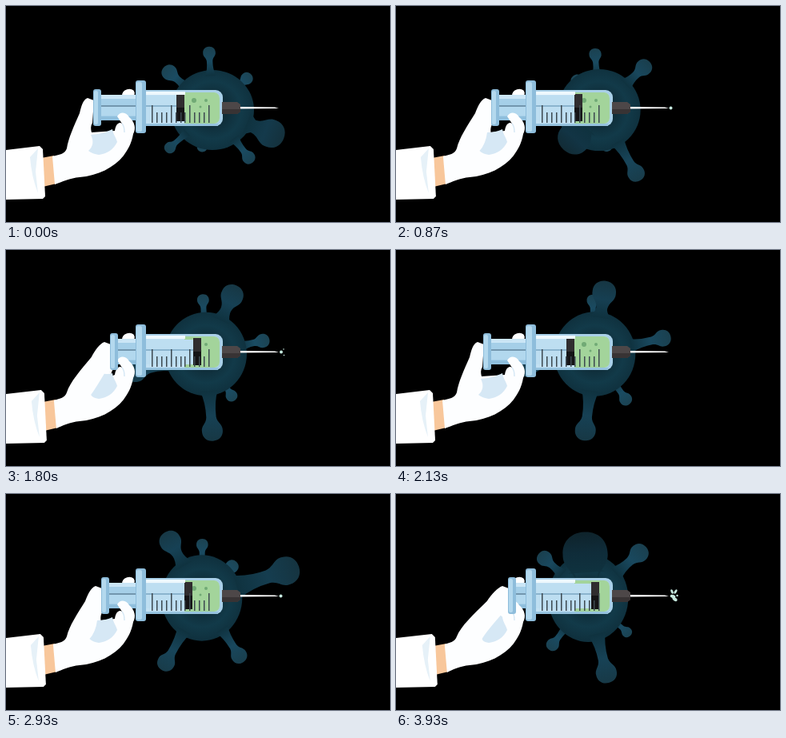
Animation of 480 by 270 pixels, one loop 3.99 s. Source, as an HTML page with a canvas:

```html
<!DOCTYPE html>
<html lang="en">
<head>
<meta charset="utf-8">
<title>Syringe and virus</title>
<style>
html, body { margin: 0; width: 100%; height: 100%; overflow: hidden; background: #000; }
canvas { display: block; width: 480px; height: 270px; }
</style>
</head>
<body>
<canvas id="stage" width="480" height="270"></canvas>
<script>
const c = document.getElementById('stage').getContext('2d');
const LOOP = 3990, STEP = 1000 / 15, PUSH = 170;
const SPIN = 46.5, CAMERA = 118;

// Start angle in degrees, distance from the axis, height, head size.
const spikes = [
  { angle: 0, reach: 45, height: 59, size: 8.5 },
  { angle: -17, reach: 50, height: -44, size: 9 },
  { angle: 140, reach: 5, height: -69, size: 8 },
  { angle: -92, reach: 78, height: -18, size: 10 },
  { angle: -113, reach: 43, height: 61, size: 9 },
  { angle: 172, reach: 50, height: 44, size: 7 },
  { angle: 189, reach: 58, height: -50, size: 11 },
  { angle: 60, reach: 70, height: 14, size: 9 }
];

function fill(color, path) {
  c.fillStyle = color;
  c.fill(new Path2D(path));
}
function box(color, x, y, w, h, r = 0) {
  c.fillStyle = color;
  c.beginPath();
  c.roundRect(x, y, w, h, r);
  c.fill();
}
function dot(color, x, y, rx, ry = rx, turn = 0) {
  c.fillStyle = color;
  c.beginPath();
  c.ellipse(x, y, rx, ry, turn, 0, 7);
  c.fill();
}
function blend(gradient, ...colors) {
  colors.forEach((color, i) => gradient.addColorStop(i / (colors.length - 1), color));
  return gradient;
}

// Turns a spike about the vertical axis and puts it in perspective.
function project(spike, t) {
  const a = (spike.angle + SPIN * t / 1000) * Math.PI / 180;
  const z = spike.reach * Math.sin(a), scale = 1 / (1 - z / CAMERA);
  return { z, scale, x: spike.reach * Math.cos(a) * scale, y: spike.height * scale, r: spike.size * scale };
}

function drawSpike({ x, y, r, scale }) {
  const dist = Math.hypot(x, y), base = Math.min(46, dist * .6) - dist;
  const light = Math.max(14, 29 - 5 * scale);
  const tone = blend(c.createLinearGradient(base, 0, r, 0),
    '#0f323f', `hsl(199 58% ${light}%)`, `hsl(197 50% ${light - 3}%)`);
  c.save();
  c.translate(x, y);
  c.rotate(Math.atan2(y, x));
  fill(tone, `M${base} ${-r * .8} Q${base * .7} ${-r * .4} ${-r * 1.2} ${-r * .45}
    C${-r * .6} ${-r * .5} ${-r * .5} ${-r} ${r * .1} ${-r * .95}
    C${r * .6} ${-r * .95} ${r} ${-r * .6} ${r} 0
    C${r} ${r * .6} ${r * .6} ${r * .95} ${r * .1} ${r * .95}
    C${-r * .5} ${r} ${-r * .6} ${r * .5} ${-r * 1.2} ${r * .45}
    Q${base * .7} ${r * .4} ${base} ${r * .8}Z`);
  c.restore();
}

function virus(t) {
  const u = t / LOOP;
  const shown = spikes.map(s => project(s, t)).sort((a, b) => a.z - b.z);
  c.save();
  c.translate(258 - 18 * u, 130);
  shown.filter(s => s.z < 0).forEach(drawSpike);
  dot(blend(c.createRadialGradient(0, 0, 0, 0, 0, 54), '#0e2934', '#0f2d39', '#123a49', '#0f303d'),
    0, 0, 52 - 2 * u, 50 + 5 * u);
  shown.filter(s => s.z >= 0).forEach(drawSpike);
  c.restore();
}

function plunger(d) {
  const x = 116 + d, w = 164 - x;
  box('#a5cfe8', x, 111, w, 32);
  box('#cbe6f6', x, 111, w, 5);
  box('#7397ae', x, 124, w, 2);
  box('#b2d8ee', x, 126, w, 11);
  box('#8fbfdd', x, 138, w, 5);
}

function hand(d) {
  const s = d * .09;
  fill('#f8c79b', `M${44 + s} 190L${60 + s} 187L${63 + s} 222L${46 + s} 226Z`);
  fill('#fff', `M0 180L${42 + s} 175L${46 + s} 179L${49 + s} 238L${46 + s} 241L0 242Z`);
  fill('#e6f1f8', `M${30 + s} 189L${40 + s} 178L${37 + s} 207L${40 + s} 234Q${32 + s} 214 ${30 + s} 189Z`);
  fill('#fdfeff', `M${58 + s} 188C66 186 74 185 76 178C${78 + d * .1} 165 ${85 + d * .4} 150 ${92 + d * .7} 134
    C${94 + d * .8} 126 ${96 + d} 117 ${102 + d} 115L${110 + d} 118L${108 + d * 1.35} 146
    Q${105 + d * 1.25} 151 ${107 + d * 1.15} 158L136 156
    C137 147 142 144 145 147L139 138C143 131 151 133 154 139C161 145 163 153 159 160
    C157 172 152 180 147 187C135 202 115 212 92 214C80 215 70 220 ${61 + s} 223Z`);
  fill('#d6e8f5', `M${106 + d * .8} ${161 - d * .3}Q${121 + d * .4} ${160 - d * .2} 133 154C134 161 138 165 139 170
    Q132 184 116 186Q108 185 ${103 + d * .15} 181Q112 173 ${106 + d * .8} ${161 - d * .3}Z`);
  c.strokeStyle = '#d6e8f5';
  c.lineWidth = 1.5;
  c.stroke(new Path2D('M145 147Q148 150 148 158'));
}

function barrel(d) {
  const x = 213 + d;
  box('#a9d0e8', 172, 105, 99, 45, [0, 9, 9, 0]);
  box('#c3e1f3', 174, 108, 93, 39, [0, 7, 7, 0]);
  box('#a3d49b', 223, 108, 44, 39, [0, 7, 7, 0]);
  dot('#71aa75', 235, 118, 3);
  dot('#71aa75', 250, 118, 2);
  dot('#71aa75', 243, 126, 1.5);
  box('#bddef1', 174, 112, x - 174, 31);
  box('#8bb4ce', 174, 124, x - 174, 2);
  box('#302d2f', x, 110, 10, 34);
  box('#151416', x, 127, 10, 17);
  for (let i = 0; i < 13; i++) {
    const top = i % 4 ? 133 : 124;
    box('#3d4950', 182 + Math.round(i * 5.92), top, 1.5, 146 - top);
  }
  box('#eef8fd', 174, 107, 50, 4);
  box('#95c2de', 172, 147, 93, 3);
  box('#8ebddb', 162, 93, 13, 66, 3);
  box('#b4d9ee', 163, 95, 7, 62, 2);
}

function needle(state) {
  fill('#4d4748', 'M270 120H289L293 123V132L289 135H270Z');
  fill('#383334', 'M270 129H293V132L289 135H270Z');
  fill('#fff', 'M293 126L336 126.4L341 128L293 128.4Z');
  const drop = '#c6e9df';
  if (state === 1 || state === 2) dot(drop, 343 + state * .5, 127.5, 2);
  if (state === 2) {
    dot(drop, 347, 124, .8);
    dot(drop, 347.5, 131.5, .8);
  }
  if (state === 3) {
    dot(drop, 345, 122, 1.5, 3, -.4);
    dot(drop, 349.5, 122, 1.5, 3, .6);
    dot(drop, 346, 128, 3.4, 2, .3);
    dot(drop, 348.5, 131.5, 3.4, 2, .6);
    dot(drop, 351.5, 127, 1.2);
  }
}

function draw(now) {
  const t = Math.floor((now % LOOP + 5) / STEP) % 60 * STEP;
  const state = Math.floor(t / PUSH) % 4, d = Math.round(state * 10.3);
  box('#000', 0, 0, 480, 270);
  virus(t);
  dot('#fff', 153, 110, 8, 6, -.3);
  plunger(d);
  hand(d);
  box('#8ebddb', 109 + d, 104, 10, 46, 3);
  box('#b4d9ee', 110 + d, 106, 5, 42, 2);
  barrel(d);
  needle(state);
}

const start = performance.now();
function tick() {
  draw(performance.now() - start);
  requestAnimationFrame(tick);
}
tick();
</script>
</body>
</html>
```
